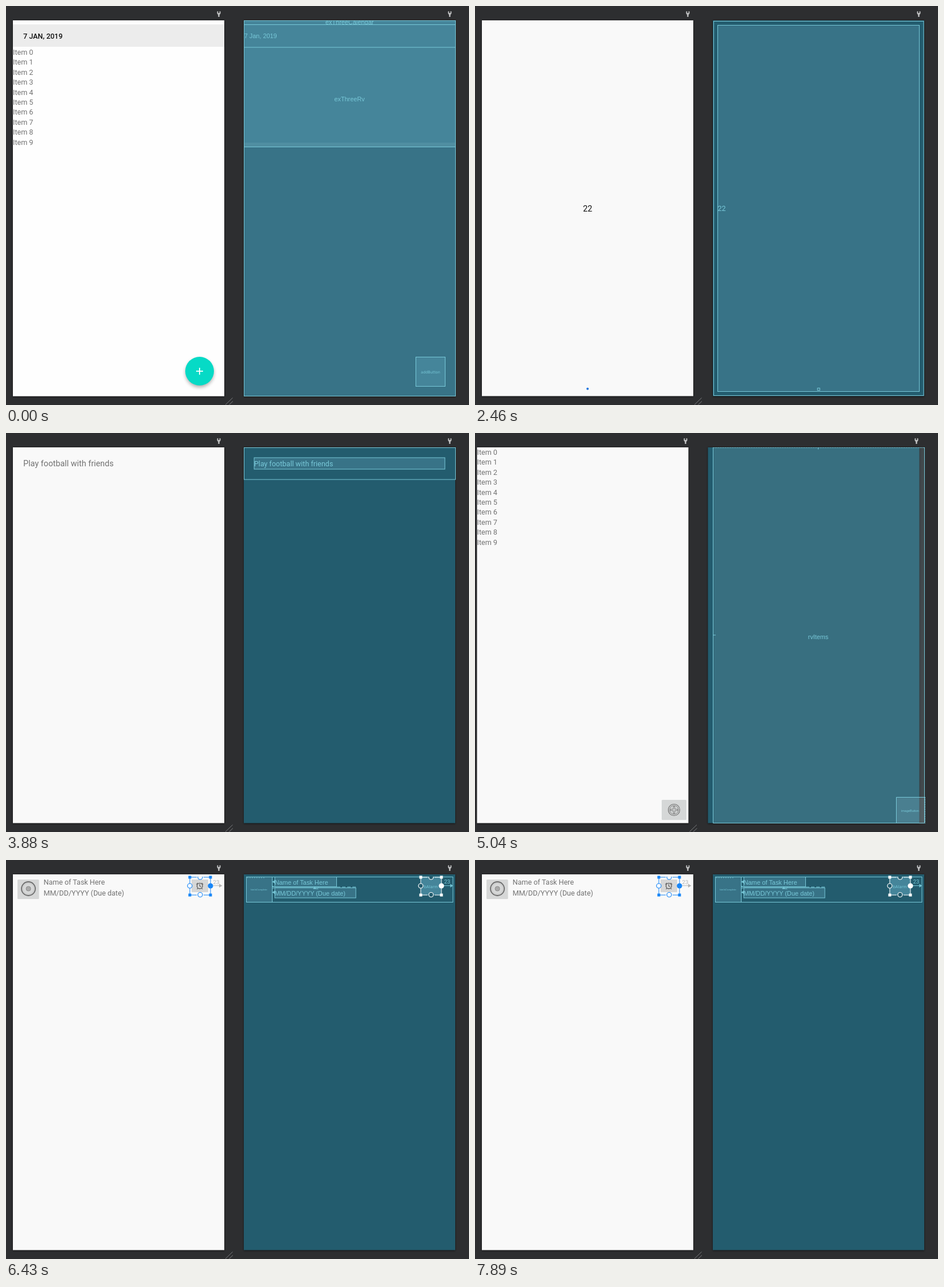
Write an HTML page that moves like this. It is 806 px wide and 695 px high and loops after 8.29 s.

```html
<!DOCTYPE html>
<html lang="en">
<head>
<meta charset="utf-8">
<title>Layout previews</title>
<style>
html, body { margin: 0; width: 100%; height: 100%; overflow: hidden; background: #2d2e30; }
svg { display: block; width: 806px; height: 695px; }
text { font-family: Roboto, sans-serif; white-space: pre; }
.thin { font-family: "Liberation Sans", Arial, sans-serif; }
.tiny { font-family: "DejaVu Sans", sans-serif; }
</style>
</head>
<body>
<svg id="stage" viewBox="0 0 806 695" xmlns="http://www.w3.org/2000/svg"></svg>
<script>
const LOOP = 8290, SHIFT = -8.5;
const LINE = '#78c8d8', PANEL = '#235c6e', FILL = '#387387', GREY = '#727272', BLUE = '#1886f7';

// start time, scene, panels shifted
const steps = [
  [0, 0, 0], [1940, 1, 1], [2090, 1, 0], [3450, 2, 1], [3580, 2, 0],
  [5040, 3, 1], [5190, 3, 0], [6430, 4, 0]
];

const rect = (x, y, w, h, fill, more = '') =>
  `<rect x="${x}" y="${y}" width="${w}" height="${h}" fill="${fill}" ${more}/>`;
const box = (x, y, w, h, fill = 'none', color = LINE, more = '') =>
  rect(x, y, w, h, fill, `stroke="${color}" ${more}`);
const circle = (x, y, r, fill, stroke = 'none', w = 1) =>
  `<circle cx="${x}" cy="${y}" r="${r}" fill="${fill}" stroke="${stroke}" stroke-width="${w}"/>`;
const path = (d, stroke, w = 1, more = '') =>
  `<path d="${d}" fill="none" stroke="${stroke}" stroke-width="${w}" ${more}/>`;
const shape = (d, fill) => `<path d="${d}" fill="${fill}"/>`;
const text = (s, x, y, size, fill, more = '') =>
  `<text x="${x}" y="${y}" font-size="${size}" fill="${fill}" ${more}>${s}</text>`;
const thin = (s, x, y, size = 10.9, more = '') => text(s, x, y, size, LINE, 'class="thin" ' + more);
const mid = 'text-anchor="middle"';
const items = y => Array.from({ length: 10 }, (_, i) =>
  text('Item ' + i, 12, y + i * 17.4, 12.53, GREY)).join('');

const wrench = x => shape(
  `M${x - 3} 9.6V12.5Q${x - 3} 14 ${x - 1.2} 15V18.6Q${x} 19.6 ${x + 1.2} 18.6V15` +
  `Q${x + 3} 14 ${x + 3} 12.5V9.6L${x + 1.2} 9V12.3H${x - 1.2}V9Z`, '#c3c4c5');

// selection frame with four corner squares and four round anchors
function handles(x, y, color, hollow, side) {
  const r = x + 36, b = y + 31, cx = x + 18, cy = y + 15;
  const sq = (a, c) => rect(a - 2.5, c - 2.5, 5, 5, color);
  return path(`M${x} ${cy}V${y}H${cx - 6}M${cx + 6} ${y}H${r}V${b}H${cx + 6}M${cx - 6} ${b}H${x}V${cy}`, color, 1) +
    sq(x, y) + sq(r, y) + sq(x, b) + sq(r, b) +
    `<g clip-path="url(#cut)">${circle(cx, y, 4, hollow, color, 1.2)}</g>` +
    circle(cx, b - .5, 4, hollow, color, 1.2) +
    circle(x, cy, 4, side, color, 1.2) + circle(r, cy, 4.6, color);
}

const alarm = circle(337.3, 45.2, 4.8, 'none', '#5c5c5c', 1.4) +
  path('M337.3 42V45.4L339.6 46.8M331.4 42.6L334 39.8M343.2 42.6L340.6 39.8M334 49.2L332.6 50.8M340.6 49.2L342 50.8', '#5c5c5c', 1.2);

const design = [
  rect(12, 25, 368, 654.5, '#fefefe') + rect(12, 32, 368, 39, '#ececec') +
  text('7 JAN, 2019', 30, 56.5, 12.53, '#111', 'font-weight="500"') + items(85) +
  `<circle cx="337" cy="639.5" r="24.5" fill="#000" opacity=".32" filter="url(#soft)"/>` +
  circle(337, 636, 25, '#06dac6') + path('M331 636.2H343M337 630.2V642.2', '#fff', 1.8),

  text('22', 196, 357.6, 14.32, '#111', mid) + circle(196, 666.8, 2, '#1a73e0'),

  text('Play football with friends', 30, 58.2, 14.32, GREY),

  items(38) + rect(333.5, 639, 43, 35, '#d5d7d7', 'rx="1.5"') +
  circle(355, 656.5, 10, 'none', '#777', 1.2) + circle(355, 656.5, 7.6, 'none', '#777', 1) +
  path('M353.7 650.6H356.3V655.2H360.9V657.8H356.3V662.4H353.7V657.8H349.1V655.2H353.7Z', '#777', 1),

  rect(20, 34, 37.5, 34, '#d6d7d7', 'rx="1.5"') + circle(39, 50, 12, 'none', '#6c6c6c', 1.8) +
  circle(39, 50, 9.8, 'none', '#c4c4c4', 1) + circle(39, 50, 4, '#aaa', '#8c8c8c', 1) +
  text('Name of Task Here', 65.5, 43, 12.53, GREY) + text('MM/DD/YYYY (Due date)', 65.5, 62.2, 12.53, GREY) +
  rect(323, 34, 29, 22, '#d6d7d7', 'rx="1"') + alarm +
  path('M361 44.7H372', '#b4b4b4') + shape('M371 41.5L376.5 44.7L371 48Z', '#b4b4b4') +
  text('23', 366, 41.5, 9.8, '#b4b4b4', mid) + handles(320, 30, BLUE, '#fff', '#fff')
];

const veil = 'rgba(170,210,225,.16)';
const blueprint = [
  rect(414, 25, 368, 654.5, FILL) + rect(414, 25, 368, 220, '#45859a') + rect(414, 238, 368, 7, '#508ea1') +
  box(414.5, 25.5, 368, 654) + path('M414 32.5H782M414 72H782M414 245.5H782', LINE) +
  `<g clip-path="url(#strip)">${thin('exThreeCalendar', 598, 32.2, 10.9, mid)}</g>` +
  thin('7 Jan, 2019', 414.7, 56) + thin('exThreeRv', 598, 165.5, 10.8, mid) +
  box(713.5, 611.5, 51, 51, '#45859a') + text('addButton', 739, 640.3, 6.4, LINE, 'class="tiny" ' + mid),

  box(415.5, 26.5, 365.5, 652) + box(422.5, 33.5, 351, 638, FILL) +
  text('22', 422.5, 357.2, 12.53, LINE) + box(596.2, 665.5, 4, 4),

  box(414.5, 25.5, 368, 55.5) + box(432, 43, 332, 20, FILL) +
  text('Play football with friends', 431.7, 58.2, 12.53, LINE),

  rect(414, 25, 368.5, 654.5, veil) + path('M414.5 25V679.5H782.5V25', LINE) +
  path('M414 25.5H783', LINE, 1, 'stroke-dasharray="2 1"') +
  path('M597.5 26V28.5M415 352H419', LINE) + thin('rvItems', 597.5, 359, 10.8, mid) +
  rect(733, 634, 50, 45.5, veil) + path('M733.5 680V634.5H783.5', LINE) +
  path('M783.5 634V680', LINE, 1, 'stroke-dasharray="2 1"') +
  thin('imageButton', 757.5, 660, 5.5, mid),

  box(418.5, 29.5, 359.5, 44) + box(418.5, 29.5, 45, 44, FILL) +
  path('M420 31H450', LINE, 1, 'stroke-dasharray="1.5 2.5"') +
  thin('btnIsComplete', 440.5, 53, 4.4, mid) +
  box(468, 29.5, 107.5, 17, FILL) + box(468, 48.5, 141, 17.5, FILL) +
  path('M464 47H576', LINE) + path('M576 47H609', LINE, 1, 'stroke-dasharray="6 3"') +
  shape('M463.5 38L468 35V41Z', LINE) + shape('M463.5 56.3L468 53.3V59.3Z', LINE) +
  shape('M534.5 50.5L537.5 46.5L540.5 50.5Z', LINE) + thin('2', 540, 50.5, 8) +
  thin('5', 463.5, 50, 7) +
  thin('Name of Task Here', 467.7, 42.8) + thin('MM/DD/YYYY (Due date)', 467.7, 62) +
  rect(722, 30, 36, 31, '#45859a') + text('bAlarm', 739.7, 48.6, 6.8, LINE, 'class="tiny" ' + mid) +
  path('M762 44.7H774', LINE) + shape('M773.5 41.5L778 44.7L773.5 48Z', LINE) +
  text('23', 768, 41.2, 9.5, LINE, mid) + handles(722, 30, '#fff', PANEL, PANEL)
];

const page = (x, fill) => rect(x, 25.5, 368, 655, '#000', 'opacity=".6" filter="url(#edge)"') + rect(x, 25, 368, 654.5, fill);
const group = (name, list) => list.map((s, i) => `<g id="${name}${i}">${s}</g>`).join('');

document.getElementById('stage').innerHTML =
  `<defs>
    <filter id="soft" x="-30%" y="-30%" width="160%" height="160%"><feGaussianBlur stdDeviation="3"/></filter>
    <filter id="edge" x="-5%" y="-5%" width="110%" height="110%"><feGaussianBlur stdDeviation="1.8"/></filter>
    <clipPath id="strip"><rect x="414" y="25" width="368" height="7.5"/></clipPath>
    <clipPath id="cut"><rect x="300" y="29" width="480" height="10"/></clipPath>
  </defs>` + rect(0, 0, 806, 695, '#2d2e30') +
  `<g id="tools">${wrench(370.5)}${wrench(772.5)}</g>
  <g id="pages">${page(12, '#f9f9f9')}${page(414, PANEL)}${group('d', design)}
  ${path('M382 694.5L394.5 682.5M388.5 694.5L395 688.5', '#85868a', .9)}</g>` +
  group('b', blueprint);

const el = id => document.getElementById(id);
const parts = design.map((_, i) => [el('d' + i), el('b' + i)]);
const pages = el('pages'), tools = el('tools');

function draw(t) {
  const [, scene, moved] = steps.filter(s => s[0] <= t).pop();
  parts.forEach((pair, i) => pair.forEach(g => g.setAttribute('display', i === scene ? 'inline' : 'none')));
  pages.setAttribute('transform', `translate(${moved * SHIFT} 0)`);
  tools.setAttribute('transform', `translate(${moved * -4} 0)`);
}

const start = performance.now();
function tick() {
  draw((performance.now() - start) % LOOP);
  requestAnimationFrame(tick);
}
tick();
</script>
</body>
</html>
```
